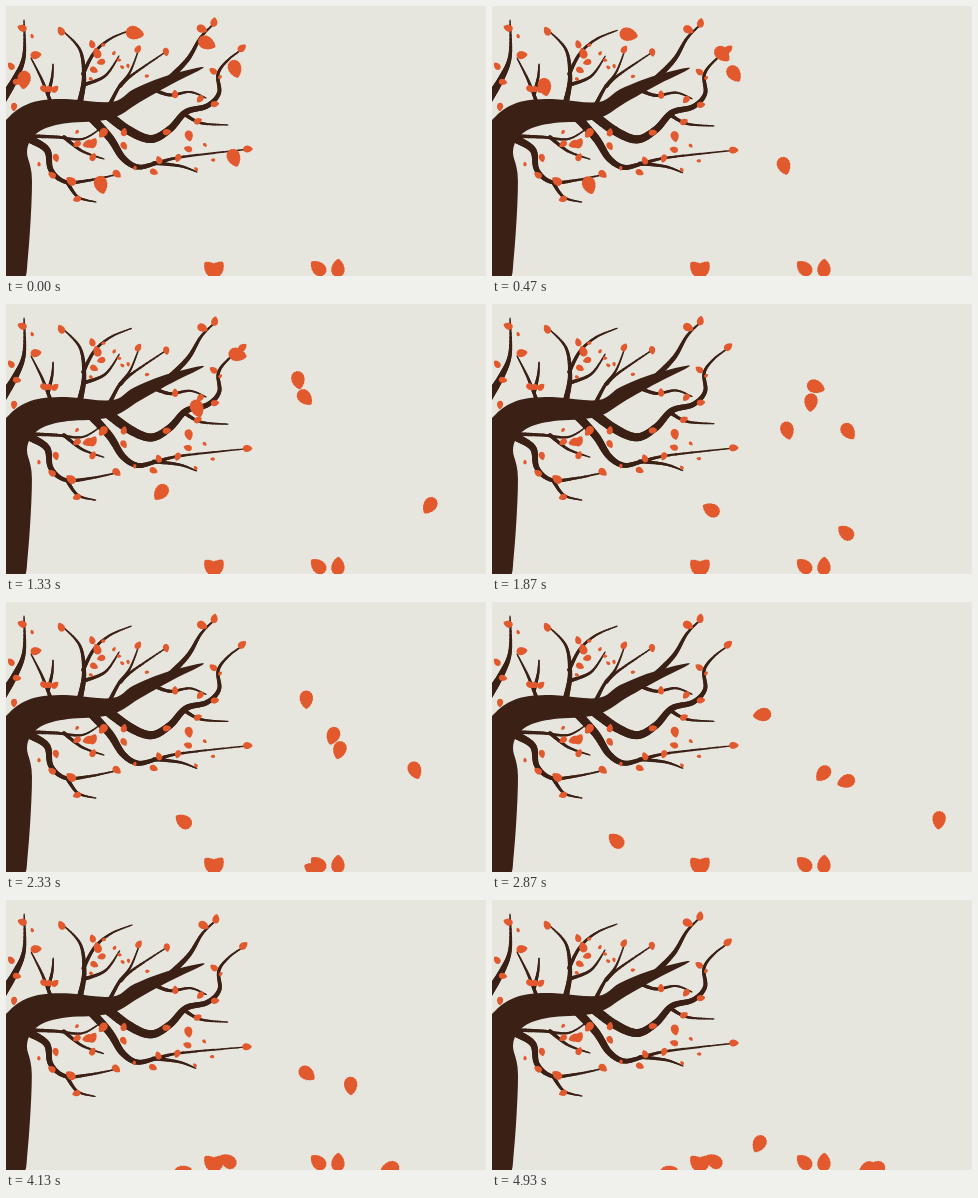
Animation of 480x270 px, one loop 4.99 s. Source, as an HTML page with a canvas:

```html
<!DOCTYPE html>
<html lang="en">
<head>
<meta charset="utf-8">
<title>Autumn tree</title>
<style>
  html, body { margin: 0; width: 100%; height: 100%; overflow: hidden; background: #e6e6df; }
  canvas { display: block; }
</style>
</head>
<body>
<canvas id="stage" width="480" height="270"></canvas>
<script>
const ctx = document.getElementById('stage').getContext('2d');
const LOOP = 4990, STEP = LOOP / 75;
const SKY = '#e6e6df', BARK = '#3b2015', LEAF = '#e2592d';

const beats = [0, 870, 1870, 2870, 3530, 4130, 4930];
const onBeats = keys => keys.map((k, i) => [beats[i], ...k]);

// Bending of the crown at each beat
const wind = onBeats([[0], [.22], [.1], [.05], [1], [.45], [0]]);

// Falling leaves at each beat: [x, y, degrees]
const falling = [
  [[129, 27, 12], [149, 31, 10], [324, 83, 20], [270, 113, 172], [309, 134, 25], [301, 174, 38], [267, 244, 118]],
  [[201, 37, 25], [260, 61, 65], [319, 99, 95], [331, 172, 132], [264, 186, 218], [345, 186, 88], [375, 269, 150]],
  [[229, 63, 72], [260, 75, 45], [357, 128, 55], [447, 219, 95], [407, 260, 172], [384, 268, 170]],
  [[18, 74, 95], [97, 90, 68], [296, 127, 75], [354, 180, 162], [271, 243, 220], [222, 261, 218]],
  [[95, 179, 75], [101, 180, 70], [219, 206, 210], [124, 239, 222], [138, 285, 290], [177, 272, 340]]
].map(onBeats);

// One leaf leaves early, with its own timing: [ms, x, y, degrees]
falling.push([[0, 228, 152, 70], [870, 359, 171, 75], [1300, 424, 200, 120],
  [1870, 353, 229, 220], [2670, 290, 284, 200]]);

// Resting leaves: [x, y, degrees]
const ground = [[205, 263, 228], [211, 263, 310], [312, 262, 224], [332, 262, 272]];

const trunk = [
  [-12, 128], [2, 112], [14, 102], [32, 95], [60, 93], [106, 96], [128, 83],
  [160, 70], [198, 61], [166, 78], [134, 96], [112, 110], [92, 115], [62, 117],
  [40, 122], [27, 131], [21, 146], [26, 175], [22, 250], [16, 275], [-12, 275]
];

// Boughs, each with a leaf at its tip: start width, then points
const boughs = [
  [9, [-4, 94], [9, 73], [18, 50], [18, 14]],
  [6, [74, 96], [78, 72], [74, 44], [57, 25]],
  [6, [162, 74], [182, 53], [195, 31], [210, 16]],
  [10, [98, 106], [122, 124], [145, 133], [164, 123], [180, 106], [201, 100],
   [213, 87], [212, 68], [222, 54], [238, 42]],
  [9, [84, 110], [104, 132], [117, 152], [132, 161], [151, 157], [176, 151], [244, 143]],
  [8, [24, 133], [41, 144], [45, 164], [60, 176], [85, 174], [113, 168]]
];

const twigs = [
  [[45, 97], [36, 74], [25, 52]],
  [[42, 88], [46, 72], [47, 58]],
  [[77, 68], [88, 47], [104, 33], [125, 24]],
  [[77, 79], [99, 70], [113, 50]],
  [[104, 98], [113, 81], [124, 66], [133, 43]],
  [[114, 80], [126, 69], [161, 45]],
  [[146, 83], [164, 89], [184, 86], [200, 92]],
  [[178, 108], [195, 117], [222, 119]],
  [[148, 157], [174, 160], [191, 166]],
  [[61, 176], [72, 191], [90, 196]],
  [[22, 130], [50, 131], [76, 133], [94, 123]],
  [[58, 131], [76, 145], [98, 153]]
];

const leavesBySize = [
  [.6, [91, 47], [196, 23], [82, 138], [87, 137], [183, 130], [65, 175], [30, 49], [97, 127]],
  [.46, [86, 38], [88, 64], [95, 56], [132, 43], [160, 46], [207, 65], [209, 98],
   [194, 93], [169, 88], [38, 83], [42, 83], [49, 83], [8, 101], [5, 60], [11, 76], [71, 138],
   [118, 126], [118, 140], [182, 143], [192, 115], [172, 152], [153, 154], [148, 166],
   [71, 193], [87, 151], [50, 152], [46, 169], [161, 126]],
  [.25, [26, 30], [85, 73], [97, 39], [108, 47], [122, 60], [116, 61], [141, 70], [71, 126],
   [33, 158], [199, 139], [207, 154], [214, 71], [129, 162], [190, 163], [113, 54]]
];

// Monotone cubic through keyed values, held after the last key
function track(keys, t) {
  const last = keys.length - 1;
  if (t >= keys[last][0]) return keys[last].slice(1);
  const i = keys.findIndex(k => k[0] > t) - 1;
  const a = keys[i], b = keys[i + 1], span = b[0] - a[0], u = (t - a[0]) / span;
  const slope = (j, c) => (keys[j + 1][c] - keys[j][c]) / (keys[j + 1][0] - keys[j][0]);
  const tangent = (j, c) => {
    if (j === 0) return slope(0, c) * .6;
    if (j === last) return 0;
    const p = slope(j - 1, c), q = slope(j, c);
    return p * q > 0 ? 2 * p * q / (p + q) : 0;
  };
  return a.slice(1).map((v, n) => {
    const c = n + 1;
    return v + (b[c] - v) * u * u * (3 - 2 * u)
      + span * u * (1 - u) * (tangent(i, c) * (1 - u) - tangent(i + 1, c) * u);
  });
}

// The further from the trunk, the deeper a point sinks
function bend([x, y], s) {
  const r = Math.max(0, x) / 240;
  return [x - (y - 105) * .055 * r * s, y + 8 * r * r * s];
}

function curvePoint(pts, u) {
  const f = u * (pts.length - 1), i = Math.min(Math.floor(f), pts.length - 2), v = f - i;
  const b = pts[i], c = pts[i + 1], a = pts[i - 1] || b, d = pts[i + 2] || c;
  return [0, 1].map(k => b[k] + .5 * v * (c[k] - a[k]
    + v * (2 * a[k] - 5 * b[k] + 4 * c[k] - d[k]
    + v * (3 * (b[k] - c[k]) + d[k] - a[k]))));
}

function drawLimb(width, pts, s) {
  const bent = pts.map(p => bend(p, s)), n = pts.length * 8;
  let from = bent[0];
  for (let i = 1; i <= n; i++) {
    const to = curvePoint(bent, i / n);
    ctx.lineWidth = width + (1.2 - width) * i / n;
    ctx.beginPath();
    ctx.moveTo(...from);
    ctx.lineTo(...to);
    ctx.stroke();
    from = to;
  }
}

function drawTrunk(s) {
  const pts = trunk.map(p => bend(p, s)), n = (pts.length - 1) * 6;
  ctx.beginPath();
  for (let i = 0; i <= n; i++) ctx.lineTo(...curvePoint(pts, i / n));
  ctx.fill();
}

// Teardrop with a finely notched edge, tip along +x
const leafShape = new Path2D();
for (let i = 0; i < 96; i++) {
  const a = i / 96 * 2 * Math.PI, r = 1 + .025 * Math.cos(16 * a);
  leafShape.lineTo(9.2 * r * Math.cos(a), 7.7 * r * Math.sin(a) * Math.sqrt(Math.sin(a / 2)));
}
leafShape.closePath();

function drawLeaf(x, y, deg, size = 1) {
  ctx.save();
  ctx.translate(x, y);
  ctx.rotate(deg * Math.PI / 180);
  ctx.scale(size, size);
  ctx.fill(leafShape);
  ctx.restore();
}

function draw(t) {
  const [s] = track(wind, t);
  ctx.fillStyle = SKY;
  ctx.fillRect(0, 0, 480, 270);

  ctx.fillStyle = ctx.strokeStyle = BARK;
  ctx.lineCap = 'round';
  boughs.forEach(([width, ...pts]) => drawLimb(width, pts, s));
  twigs.forEach(pts => drawLimb(4, pts, s));
  drawTrunk(s);

  ctx.fillStyle = LEAF;
  boughs.forEach(([, ...pts], i) => {
    const [x, y] = bend(pts[pts.length - 1], s);
    drawLeaf(x - 2, y + (i ? 0 : 8), 200 + i * 40, .52);
  });
  leavesBySize.forEach(([size, ...spots]) => spots.forEach((p, i) =>
    drawLeaf(...bend(p, s), 250 + i * 137 + 4 * s, size)));
  ground.forEach(g => drawLeaf(...g));
  falling.forEach(keys => drawLeaf(...track(keys, t)));
}

const start = performance.now();
function tick() {
  const t = (performance.now() - start) % LOOP;
  draw(Math.floor(t / STEP) * STEP);
  requestAnimationFrame(tick);
}
tick();
</script>
</body>
</html>
```
